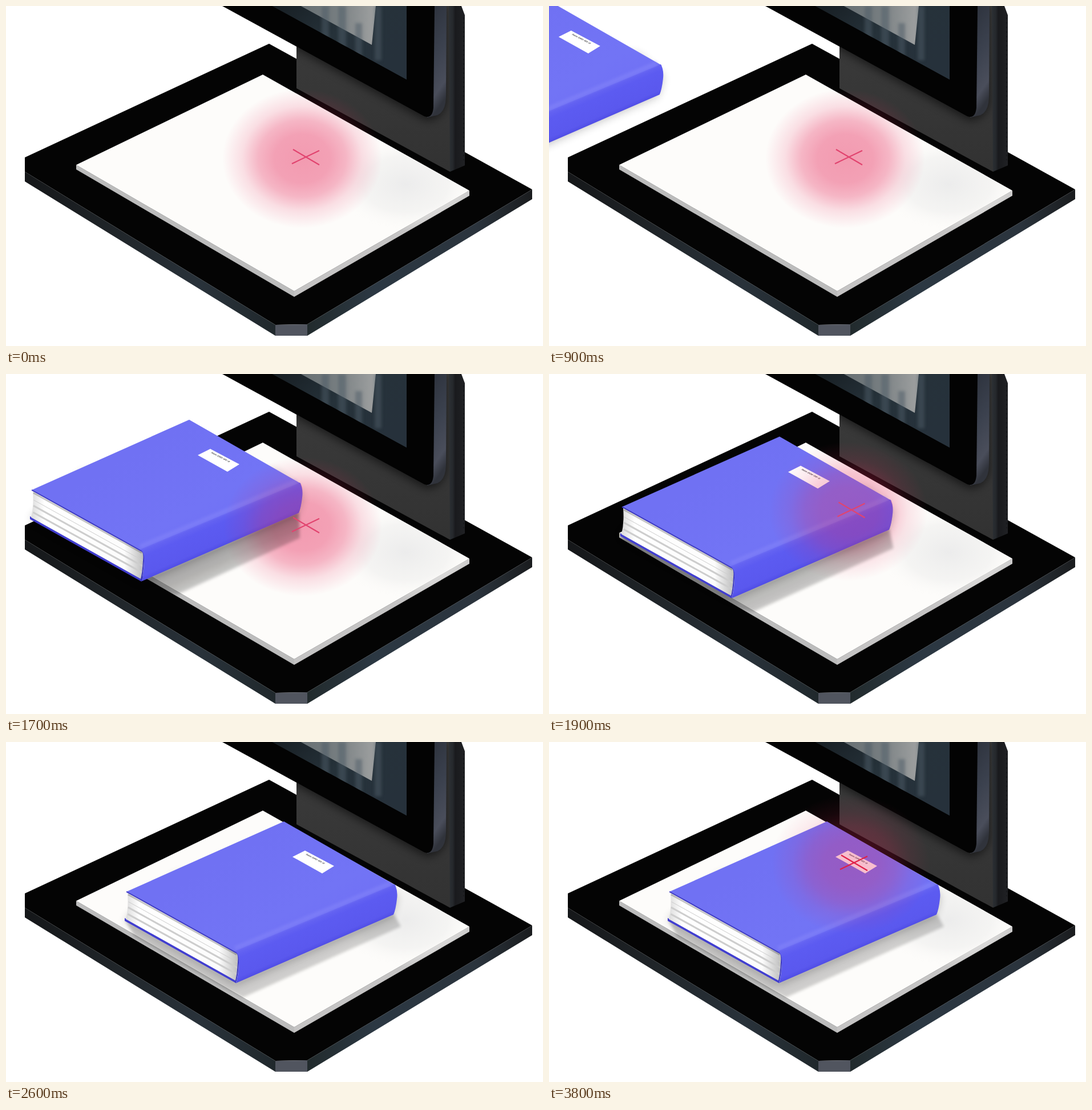
An HTML page that plays this animation: 941x595 px, repeating every 4800 ms.

```html
<!DOCTYPE html>
<html lang="en">
<head>
<meta charset="utf-8">
<title>Book scanner</title>
<style>
  html, body { margin: 0; width: 100%; height: 100%; overflow: hidden; background: #fff; }
  svg { display: block; width: 100%; height: 100%; }
  text { font: 600 5px Inter, Arial, sans-serif; }
</style>
</head>
<body>
<svg viewBox="0 0 941 595">
  <defs>
    <linearGradient id="leftSide"><stop stop-color="#151719"/><stop offset=".35" stop-color="#202529"/><stop offset=".7" stop-color="#29323a"/><stop offset="1" stop-color="#20282c"/></linearGradient>
    <linearGradient id="rightSide"><stop stop-color="#222b2d"/><stop offset=".3" stop-color="#2c3843"/><stop offset=".75" stop-color="#2b343d"/><stop offset="1" stop-color="#1a1c1e"/></linearGradient>
    <linearGradient id="plate" x2="0" y2="1"><stop stop-color="#3c3c3c"/><stop offset=".6" stop-color="#363636"/><stop offset="1" stop-color="#323232"/></linearGradient>
    <linearGradient id="post"><stop stop-color="#2c3034"/><stop offset=".25" stop-color="#25282c"/><stop offset=".4" stop-color="#191a1d"/><stop offset="1" stop-color="#202124"/></linearGradient>
    <linearGradient id="rim" x2=".25" y2="1"><stop stop-color="#2b303a"/><stop offset=".5" stop-color="#3b414e"/><stop offset=".85" stop-color="#4a4e5b"/><stop offset="1" stop-color="#30333b"/></linearGradient>
    <linearGradient id="screen" x2="1" y2=".6"><stop stop-color="#171e23"/><stop offset=".5" stop-color="#26323a"/><stop offset="1" stop-color="#26313b"/></linearGradient>
    <linearGradient id="card"><stop stop-color="#656d70"/><stop offset=".5" stop-color="#757c7f"/><stop offset="1" stop-color="#9fa1a1"/></linearGradient>
    <radialGradient id="paperShade"><stop stop-color="#ececec"/><stop offset=".6" stop-color="#efefee" stop-opacity=".6"/><stop offset="1" stop-color="#fdfcfa" stop-opacity="0"/></radialGradient>
    <radialGradient id="red"><stop stop-color="#e6285a" stop-opacity=".46"/><stop offset=".35" stop-color="#e6285a" stop-opacity=".43"/><stop offset=".55" stop-color="#e6285a" stop-opacity=".33"/><stop offset=".75" stop-color="#e6285a" stop-opacity=".14"/><stop offset="1" stop-color="#e6285a" stop-opacity="0"/></radialGradient>
    <linearGradient id="cover" gradientUnits="userSpaceOnUse" x1="420" y1="180" x2="505" y2="330"><stop stop-color="#7071f3"/><stop offset=".8" stop-color="#7274f5"/><stop offset="1" stop-color="#7172f5"/></linearGradient>
    <linearGradient id="spine" gradientUnits="userSpaceOnUse" x1="530" y1="310" x2="552" y2="361"><stop stop-color="#6766f2"/><stop offset=".25" stop-color="#5c5bf1"/><stop offset=".8" stop-color="#5a58ee"/><stop offset="1" stop-color="#4c49e2"/></linearGradient>
    <linearGradient id="pages" gradientUnits="userSpaceOnUse" x1="210" y1="0" x2="407" y2="0"><stop stop-color="#dcdcdc"/><stop offset=".12" stop-color="#fff"/><stop offset=".83" stop-color="#fcfcfc"/><stop offset="1" stop-color="#bcbcbc"/></linearGradient>
    <linearGradient id="shade" gradientUnits="userSpaceOnUse" x1="530" y1="360" x2="555" y2="415"><stop stop-opacity=".36"/><stop offset=".5" stop-opacity=".3"/><stop offset="1" stop-opacity=".16"/></linearGradient>
    <filter id="soft" x="-30%" y="-30%" width="160%" height="160%"><feGaussianBlur stdDeviation="2.5"/></filter>
    <filter id="wide" x="-30%" y="-30%" width="160%" height="160%"><feGaussianBlur stdDeviation="8"/></filter>
    <clipPath id="onPaper"><path d="M450 120 812 323V332L505 509 123 286V278Z"/></clipPath>
    <clipPath id="onPlate"><path d="M509 72V144L778 290V0H509Z"/></clipPath>
    <clipPath id="onScreen"><path d="M466 0 702 129V0Z"/></clipPath>
    <clipPath id="onBook"><path id="outline" d="M487 139 683 251Q687 259 685 275 683 293 679 302L403 422 208 313 211 262Z"/></clipPath>
  </defs>

  <!-- base and paper -->
  <path fill="#040404" d="M33 265 461 66 922 321 528 557 472 558 33 290Z"/>
  <path fill="url(#leftSide)" d="M33 290 472 558V577L33 307Z"/>
  <path fill="#51555f" d="M472 558 528 557V577H472Z"/>
  <path fill="url(#rightSide)" d="M528 557 922 321V338L528 577Z"/>
  <path fill="#bcbcbc" d="M123 278 505 499V509L123 286Z"/>
  <path fill="#c5c4c4" d="M505 499 812 323V332L505 509Z"/>
  <path fill="#fdfcfa" d="M450 120 812 323 505 499 123 278Z"/>
  <ellipse cx="700" cy="312" rx="125" ry="82" fill="url(#paperShade)" clip-path="url(#onPaper)"/>

  <!-- stand and tablet -->
  <path fill="url(#plate)" d="M509 72V144L778 290V0H509Z"/>
  <g clip-path="url(#onPlate)">
    <path d="M480 60 735 200Q762 201 772 170V0H480Z" opacity=".55" filter="url(#wide)"/>
  </g>
  <path fill="url(#post)" d="M778 290 804 279V16L798 0H776Z"/>
  <path stroke="#111214" stroke-dasharray="3 5" d="M802 20V270"/>
  <path fill="url(#rim)" d="M750 0H772L771 160Q770 185 756 191L738 195Z"/>
  <path fill="#030303" d="M379 0 733 193Q747 198 749 178L751 0Z"/>
  <g clip-path="url(#onScreen)">
    <path fill="url(#screen)" d="M466 0H702V129Z"/>
    <path fill="url(#card)" d="M502 0H648L641 68 502-8Z"/>
    <g fill="#4d5c66" opacity=".5" filter="url(#soft)">
      <path d="M553 0H566V60H553ZM582 0H596V75H582ZM612 30H624V90H612ZM646 0H658V95H646Z"/>
    </g>
  </g>

  <g class="light"><ellipse id="paperGlow" cx="519" cy="267" rx="140" ry="122" fill="url(#red)"/></g>

  <!-- book -->
  <g clip-path="url(#onPaper)"><path id="shadow" fill="url(#shade)" filter="url(#soft)"/></g>
  <g id="book">
    <path d="M208 312 403 424 676 305 686 270 640 230 300 230Z" opacity=".24" filter="url(#wide)"/>
    <path fill="#413ed0" d="M208 308 403 417V422L208 313Z"/>
    <path fill="url(#pages)" d="M213 264 406 370Q409 395 403 418L210 310Q215 290 213 264Z"/>
    <g id="leaves" fill="none" stroke="#cdcdcd"></g>
    <path fill="none" stroke="#444" stroke-width="3" opacity=".3" d="M214 267 404 372"/>
    <path fill="url(#cover)" d="M487 139 683 251 405 369 211 262Z"/>
    <path fill="none" stroke="#3c39c2" stroke-width="2" d="M211 262 402 368Q409 369 407 386 406 408 402 421"/>
    <path fill="url(#spine)" d="M401 366 681 249Q687 259 685 275 683 293 679 302L403 422Q408 405 408 386 409 371 401 366Z"/>
    <path stroke="#8888fa" stroke-width="7" opacity=".5" filter="url(#soft)" d="M401 361 674 247"/>
    <path fill="#fff" d="M524 190 575 217 554 230 502 201Z"/>
    <text transform="matrix(.87 .46 -.7 .44 525 197)" fill="#333">Item 000-00-0</text>
  </g>

  <g clip-path="url(#onBook)"><g class="light"><ellipse cx="521" cy="267" rx="140" ry="122" fill="url(#red)" opacity=".68"/></g></g>
  <g class="light"><path id="cross" stroke="#e1446f" stroke-width="2.2" d="M501 276 549 253M503 251 549 278"/></g>
</svg>
<script>
const LOOP = 4800, STEP = 100, ENTER = 500, ABOVE = 1700, LANDED = 2100;
const DARK = [[2600, 3100], [3600, 3800]];
const [book, shadow, outline, leaves, paperGlow, cross] =
  ['book', 'shadow', 'outline', 'leaves', 'paperGlow', 'cross'].map(id => document.getElementById(id));
const lights = document.querySelectorAll('.light');
const mix = (a, b, k) => a + (b - a) * k;

// page edges: [depth, line width]
leaves.innerHTML = [[.3, 1], [.52, 3], [.78, 3]].map(([depth, width]) => {
  const y = 45 * depth;
  return `<path stroke-width="${width}" d="M${215 - 2 * depth} ${266 + y}L406 ${372 + y}"/>`;
}).join('');

function bookOffset(time, landing) {
  const hoverSteps = Math.min(0, time - ABOVE) / STEP;
  return [mix(-166, 0, landing) + 39.9 * hoverSteps, mix(-59, 0, landing) + 11 * hoverSteps];
}

function draw(now) {
  const time = Math.floor(now % LOOP / STEP) * STEP;
  const landing = Math.min(1, Math.max(0, (time - ABOVE) / (LANDED - ABOVE)));
  const place = `translate(${bookOffset(time, landing)})`;
  const present = time >= ENTER ? 'visible' : 'hidden';
  const lit = !DARK.some(([from, to]) => time >= from && time < to);

  for (const part of [book, shadow, outline]) {
    part.setAttribute('transform', place);
    part.setAttribute('visibility', present);
  }
  const near = [mix(466, 415, landing), mix(445, 447, landing)];
  const far = [mix(681, 692, landing), mix(346, 323, landing)];
  shadow.setAttribute('d', `M208 310L403 420 679 300 ${far}L${near} 385 ${mix(436, 432, landing)} 225 340Z`);
  shadow.setAttribute('opacity', mix(1, .6, landing));

  for (const light of lights) {
    light.setAttribute('transform', `translate(${9 * landing} ${-53 * landing})`);
    light.setAttribute('visibility', lit ? 'visible' : 'hidden');
  }
  paperGlow.setAttribute('opacity', mix(1, .6, landing));
  cross.setAttribute('stroke', landing === 1 ? '#e02048' : '#e1446f');
}

function frame() {
  draw(performance.now());
  requestAnimationFrame(frame);
}
frame();
</script>
</body>
</html>
```
